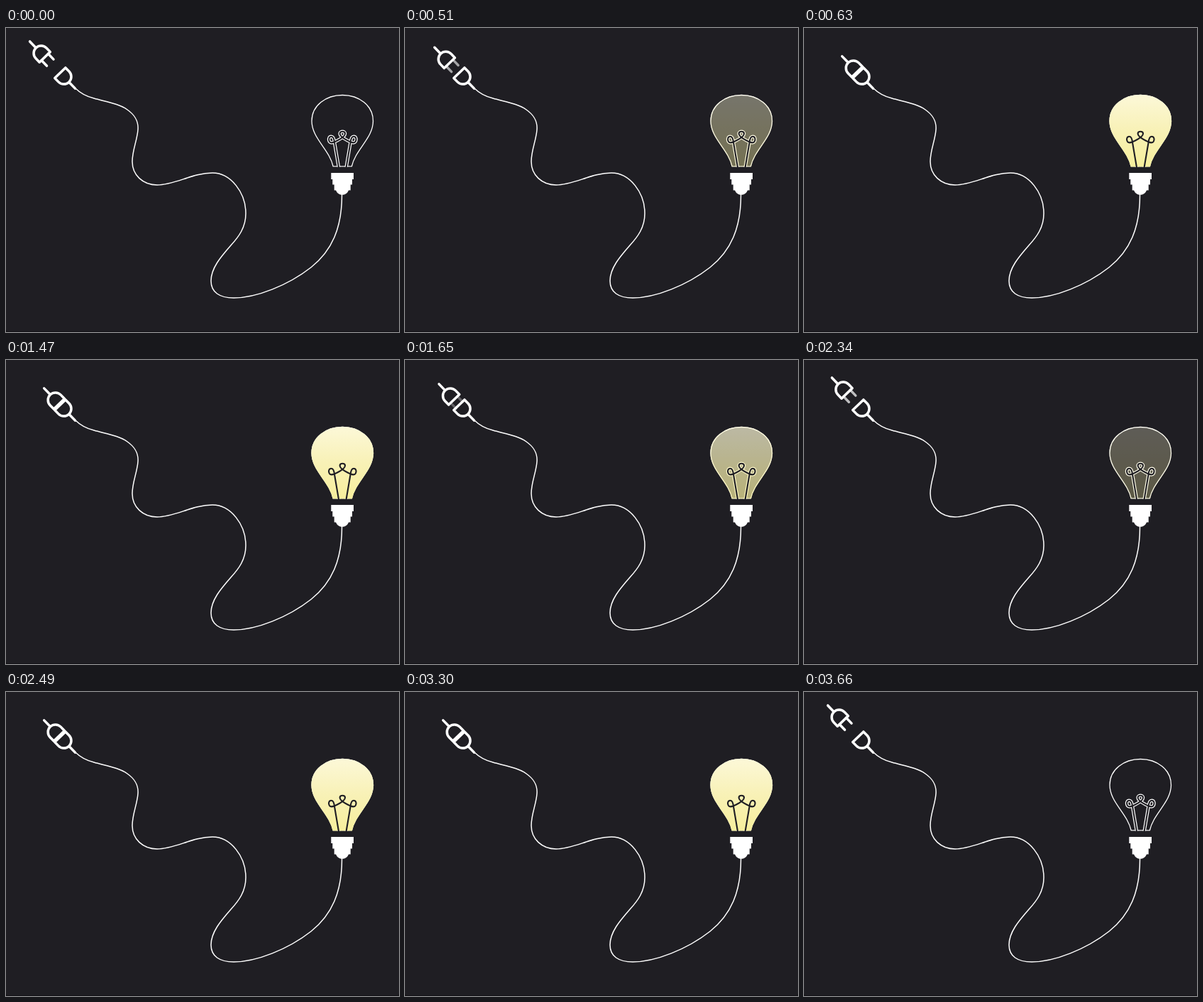
Recreate the animation shown at these times as an HTML page. Size 554 by 428 pixels, loop 4.02 s.

```html
<!DOCTYPE html>
<html lang="en">
<head>
<meta charset="utf-8">
<title>Plug and bulb</title>
<style>
  html, body { margin: 0; width: 100%; height: 100%; overflow: hidden; background: #131216; }
  svg { display: block; width: 100%; height: 100%; }
  .line { fill: none; stroke: #fff; stroke-linecap: round; stroke-linejoin: round; }
</style>
</head>
<body>
<svg viewBox="0 0 554 428">
  <defs>
    <linearGradient id="glow" gradientUnits="userSpaceOnUse" x1="0" y1="94" x2="0" y2="196">
      <stop offset="0" stop-color="#fcf8d8"/>
      <stop offset=".5" stop-color="#f8f1b6"/>
      <stop offset="1" stop-color="#f7ef9c"/>
    </linearGradient>
    <path id="glass" d="M461.2 195C456 171 431 155 431 131C431 109 451 94.5 474.3 94.5
      S517.5 109 517.5 131C517.5 155 492.5 171 487.3 195Z"/>
    <path id="wire" d="M469.3 198L463 161C462.4 155.5 461 152.8 458.5 152.8C455 152.8 454.2 157 456 160
      C458 163 463 160.5 467 158.5C472 156 478 152.5 478 148.8C478 144.8 470.6 144.8 470.6 148.8
      C470.6 152.5 476.6 156 481.6 158.5C485.6 160.5 490.6 163 492.6 160
      C494.4 157 493.6 152.8 490.1 152.8C487.6 152.8 486.2 155.5 485.6 161L479.3 198"/>
    <clipPath id="inside"><rect x="425" y="88" width="100" height="107.6"/></clipPath>
    <path id="half" d="M1 -10.5H8.5A10.5 10.5 0 0 1 8.5 10.5H1ZM19 0H31.5"/>
  </defs>

  <rect width="554" height="427" rx="3" fill="#1f1e23"/>

  <path class="line" stroke-width="1.5" d="M98 85C104 91 112 96 124 99C142 104 160 107 171 115
    C181 122 187 130 186 143C185 158 178 172 178 188C178 207 193 221 213 221
    C238 221 263 204 291 204C317 204 338 232 338 261C338 281 328 294 317 306
    C303 322 289 338 289 356C289 372 301 380 321 380C353 380 398 362 430 337
    C459 314 474 282 473.5 233"/>

  <g transform="translate(75.6 62.5) rotate(46)">
    <use href="#half" class="line" stroke-width="3.5"/>
    <g id="plug">
      <path id="prongs" class="line" stroke-width="3.5" d="M-1 -6.6H9.8M-1 6.6H9.8"/>
      <use href="#half" class="line" stroke-width="3.5" transform="scale(-1 1)"/>
    </g>
  </g>

  <g clip-path="url(#inside)">
    <use href="#glass" class="line" stroke-width="1.3"/>
    <use href="#wire" class="line" stroke-width="4.5"/>
    <use id="light" href="#glass" fill="url(#glow)" stroke="url(#glow)" stroke-width="1.3" opacity="0"/>
  </g>
  <use href="#wire" fill="none" stroke="#1f1e23" stroke-width="2.1" stroke-linejoin="round"/>

  <path fill="#fff" d="M458.3 204H490V213H488V220.5H485.7V228.5H483C481 233 478 234.8 474 234.8
    S467 233 465 228.5H462.7V220.5H460.3V213H458.3Z"/>
</svg>
<script>
  const LOOP = 4020, STEP = 30, MOVE = 300, GAP = 29;
  // [start, from, to]: 0 is unplugged, 1 is plugged in
  const moves = [[330, 0, 1], [1500, 1, 0], [2190, 0, 1], [3360, 1, 0]];
  const [plug, prongs, light] = ['plug', 'prongs', 'light'].map(id => document.getElementById(id));
  const easeIn = x => x ** 1.8;

  function level(t) {
    let v = 0;
    for (const [start, from, to] of moves) {
      if (t >= start) v = from + (to - from) * easeIn(Math.min(1, (t - start) / MOVE));
    }
    return v;
  }

  function draw(ms) {
    const v = level(Math.floor((ms % LOOP) / STEP) * STEP);
    plug.setAttribute('transform', `translate(${GAP * (v - 1)} 0)`);
    prongs.setAttribute('opacity', 1 - v);
    light.setAttribute('opacity', v);
  }

  const begin = performance.now();
  function tick() {
    draw(performance.now() - begin);
    requestAnimationFrame(tick);
  }
  tick();
</script>
</body>
</html>
```
